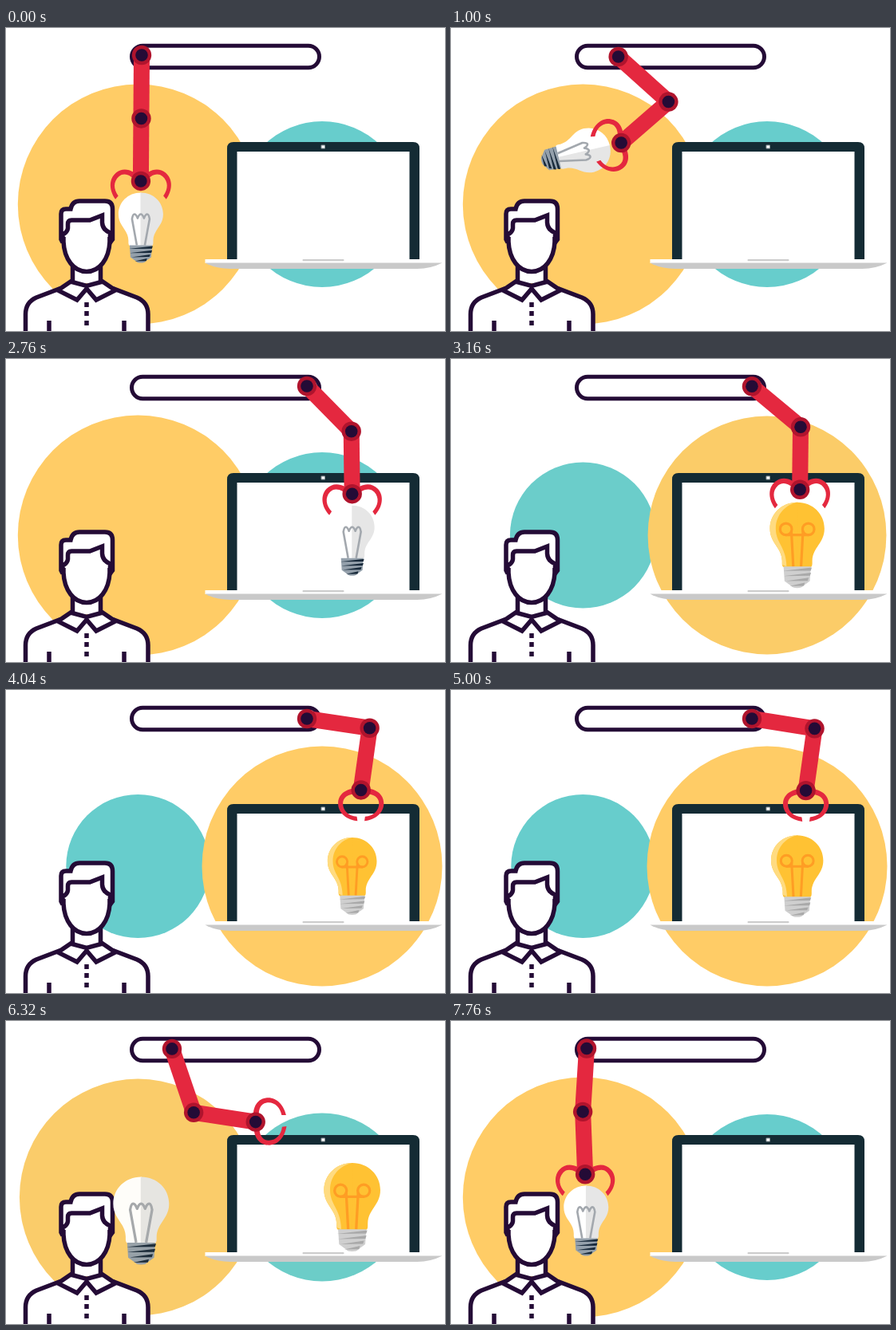
Recreate the animation shown at these times as an HTML page. Size 550 by 380 pixels, loop 7800 ms.

```html
<!DOCTYPE html>
<html lang="en">
<head>
<meta charset="utf-8">
<title>Idea transfer</title>
<style>
html, body { margin: 0; width: 100%; height: 100%; overflow: hidden; background: #fff; }
svg { display: block; width: 550px; height: 380px; }
.ink { fill: #fff; stroke: #240b36; stroke-width: 5.5; }
.line { fill: none; }
.arm { stroke: #e4283f; stroke-width: 20; }
.wire { fill: none; stroke-width: 2.6; stroke-linejoin: round; }
</style>
</head>
<body>
<svg viewBox="0 0 550 380">
  <defs>
    <path id="half" d="M-.4-44H0C16-44 28-32 28-17C28-2 16 2 15.5 16V19Q15.5 23 12 23H-.4Z"/>
    <path id="cap" d="M-14 22H14L13 37L6 42Q5 44 0 44Q-5 44-6 42L-13 37Z"/>
    <path id="finger" d="M0-2C-17-3-28 5-28 17C-28 30-16 38-3 39L-4 33.500C-14 33-22 27-22 17C-22 9-14 4 0 5Z"/>
    <g id="joint"><circle r="12.2" fill="#b0142d"/><circle r="7.8" fill="#240b36"/></g>
    <g id="dull">
      <use href="#half" fill="#fff" transform="scale(-1 1)"/>
      <use href="#half" fill="#e6e6e6"/>
      <path class="wire" stroke="#a3a8ae" d="M-5 22L-11-11Q-10-17-8-17Q-6-17-4-12Q-2-17 0-17Q2-17 4-12Q6-17 8-17Q10-17 11-11L5 22"/>
      <use href="#cap" fill="#94a0ab"/>
      <path class="thread" fill="#17293a"/>
    </g>
    <g id="lit">
      <use href="#half" fill="#ffc233" transform="scale(-1 1)"/>
      <use href="#half" fill="#ffc233"/>
      <path fill="#ffdb80" d="M0-44C-16-44-28-32-28-17C-28-2-16 2-15.500 16V20L-11 22C-11 2-22-2-22-17C-22-32-11-42 0-44Z"/>
      <g class="wire" stroke="#ff9d24">
        <circle cx="-11.500" cy="-16.500" r="6"/><circle cx="11.500" cy="-16.500" r="6"/>
        <path d="M-12-10.500H12M-4 22L-6-15M4 22L6-15"/>
      </g>
      <use href="#cap" fill="#cfcfcf"/>
      <path class="thread" fill="#a9a9a9"/>
    </g>
  </defs>

  <circle id="left" cx="165.300" cy="221"/>
  <circle id="right" cx="396" cy="221"/>

  <g id="laptop">
    <path fill="#142b34" d="M277 290V151Q277 143 285 143H510Q518 143 518 151V290Z"/>
    <path fill="#fff" d="M289.500 155H505.500V290H289.500Z"/>
    <rect x="394.500" y="146.500" width="5.500" height="5" rx="1" fill="#8b979b"/>
    <rect x="395.500" y="147.500" width="3.500" height="3" fill="#fff"/>
    <path fill="#fff" d="M249.500 290H546V295H249.500Z"/>
    <path fill="#c9c9c9" d="M249.500 294.500H546.500Q532 302 515 302H281Q262 302 249.500 294.500Z"/>
    <rect x="371.500" y="290" width="52" height="2.200" rx="1" fill="#ccc"/>
  </g>

  <g id="person">
    <path class="ink" d="M24.500 384V359Q24.500 344 38 338L67 327H135L164 338Q178 344 178 359V384"/>
    <path class="ink" d="M83.500 320V296H118.500V320"/>
    <path class="ink" d="M81 318L65 329L89 341L101 327L113 341L137 329L121 318L101 323.500Z"/>
    <path fill="#fff" d="M73 236H130V268H73Z"/>
    <path class="ink" d="M72 262V268C73 290 85 305.500 101 305.500C117 305.500 129 290 130 268V262"/>
    <path class="ink" d="M71 269L69 265V233Q69 227 75 227H81Q83 217 92 217H124Q133.500 217 133.500 227V265L130.500 269V257Q121 253 120.500 244V235L105 241H82Q77.500 241 77.500 246V251Q77 256 71 259Z"/>
    <path class="ink line" d="M101 344V350M101 355V361M101 367V373M54 367V381M148 367V381"/>
  </g>

  <rect x="157.500" y="22.300" width="235" height="27.500" rx="13.700" fill="#fff" stroke="#240b36" stroke-width="5"/>

  <use id="lamp" href="#dull"/>
  <use id="glow" href="#lit"/>

  <g id="hand" fill="#e4283f">
    <use id="clawL" href="#finger"/>
    <use id="clawR" href="#finger"/>
  </g>
  <line id="upper" class="arm"/>
  <line id="lower" class="arm"/>
  <use id="shoulderJoint" href="#joint"/>
  <use id="elbowJoint" href="#joint"/>
  <use id="wristJoint" href="#joint"/>
</svg>
<script>
const LOOP = 7800, RELEASE = 2860, FOREARM = 78.5;
const YELLOW = [255, 204, 102], TEAL = [103, 205, 204];
const $ = id => document.getElementById(id);

const clamp = x => Math.min(1, Math.max(0, x));
const mix = (a, b, p) => a + (b - a) * p;
const blend = (a, b, p) => `rgb(${a.map((v, i) => Math.round(mix(v, b[i], p)))})`;

// Screw threads: slanted wedges stacked down the cap.
const wedges = [0, 1, 2, 3].map(i => {
  const y = 23 + 5.2 * i, w = 15 - i * i * .8;
  return `M${w} ${y}L${-w} ${y + 3.5}L${w - 1} ${y + 3.2}Z`;
}).join('');
document.querySelectorAll('.thread').forEach(p => p.setAttribute('d', wedges));

function disc(id, r, color) {
  $(id).setAttribute('r', r);
  $(id).setAttribute('fill', color);
}

function place(id, [x, y], extra = '') {
  $(id).setAttribute('transform', `translate(${x} ${y}) ${extra}`);
}

function bone(id, a, b) {
  const ends = { x1: a[0], y1: a[1], x2: b[0], y2: b[1] };
  for (const k in ends) $(id).setAttribute(k, ends[k]);
}

// Angles are measured in degrees from straight down, positive to the right.
function swing([x, y], length, degrees) {
  const a = degrees * Math.PI / 180;
  return [x + length * Math.sin(a), y + length * Math.cos(a)];
}

function draw(t) {
  const linear = (a, b) => clamp((t - a) / (b - a));
  const ease = (a, b) => (1 - Math.cos(Math.PI * linear(a, b))) / 2;

  // Phases of the arm's round trip, each going from 0 to 1.
  const lift = ease(0, 950), fling = ease(1600, 2080), settle = ease(2080, 2400);
  const lower = ease(1760, 2300), raise = ease(RELEASE, 4040);
  const retreat = ease(4900, 7060), stretch = ease(5022, 6480), sink = ease(6860, 7740);
  const travel = linear(840, 1681) - linear(5235, 6565);

  const shoulder = [170 + 207 * travel, 34 + 2 * (lift - lower + raise) - 1.5 * retreat];
  const upperAngle = -.4 + 48.4 * lift - 3.5 * lower + 37 * raise - 85 * retreat;
  const lowerAngle = -.4 - 48.6 * lift + 49.7 * lower - 8.7 * raise + 92 * stretch - 81.8 * sink;
  const turn = 77 * lift - 99 * fling + 22 * settle - 95 * (stretch - sink);
  const grip = 50 - 30 * ease(0, 250) + 30 * ease(2560, RELEASE) - 48 * ease(3100, 3650)
    + 4 * stretch + 36 * ease(7240, 7760);

  const elbow = swing(shoulder, 79.5 + 5 * (lift - lower + stretch - sink), upperAngle);
  const wrist = swing(elbow, FOREARM, lowerAngle);
  bone('upper', shoulder, elbow);
  bone('lower', elbow, wrist);
  place('shoulderJoint', shoulder);
  place('elbowJoint', elbow);
  place('wristJoint', wrist);
  place('hand', wrist, `rotate(${turn})`);
  $('clawL').setAttribute('transform', `rotate(${grip})`);
  $('clawR').setAttribute('transform', `scale(-1 1) rotate(${grip})`);

  const swap = ease(2800, 3200) - ease(5960, 6370);
  disc('left', mix(150.5, 90, swap), blend(YELLOW, TEAL, swap));
  disc('right', mix(104, 150.5, swap), blend(TEAL, YELLOW, swap));

  // The delivered bulb lights up with a bounce, swells, then shrinks away.
  const drop = [433.7, mix(228, 233.5, ease(RELEASE, 3100))];
  const size = 1 + .1 * ease(RELEASE, 3060) + .12 * Math.sin(Math.PI * linear(RELEASE, 3500))
    + .165 * linear(4040, 6400);
  place('glow', drop, `scale(${size * (1 - ease(6400, 6660))})`);
  $('glow').style.opacity = linear(RELEASE, RELEASE + 180);

  const held = t < RELEASE, fresh = t > 4000;
  if (held) place('lamp', wrist, `rotate(${turn}) translate(0 58.5)`);
  else if (fresh) place('lamp', [169.3, 250.4], `scale(${1.25 * ease(6020, 6320) - .25 * ease(6320, 6640)})`);
  else place('lamp', drop, `scale(${size})`);
  $('lamp').style.opacity = fresh ? 1 - swap : 1 - linear(RELEASE + 100, RELEASE + 180);
}

const start = performance.now();
function tick(now) {
  draw(Math.max(0, now - start) % LOOP);
  requestAnimationFrame(tick);
}
draw(0);
requestAnimationFrame(tick);
</script>
</body>
</html>
```
